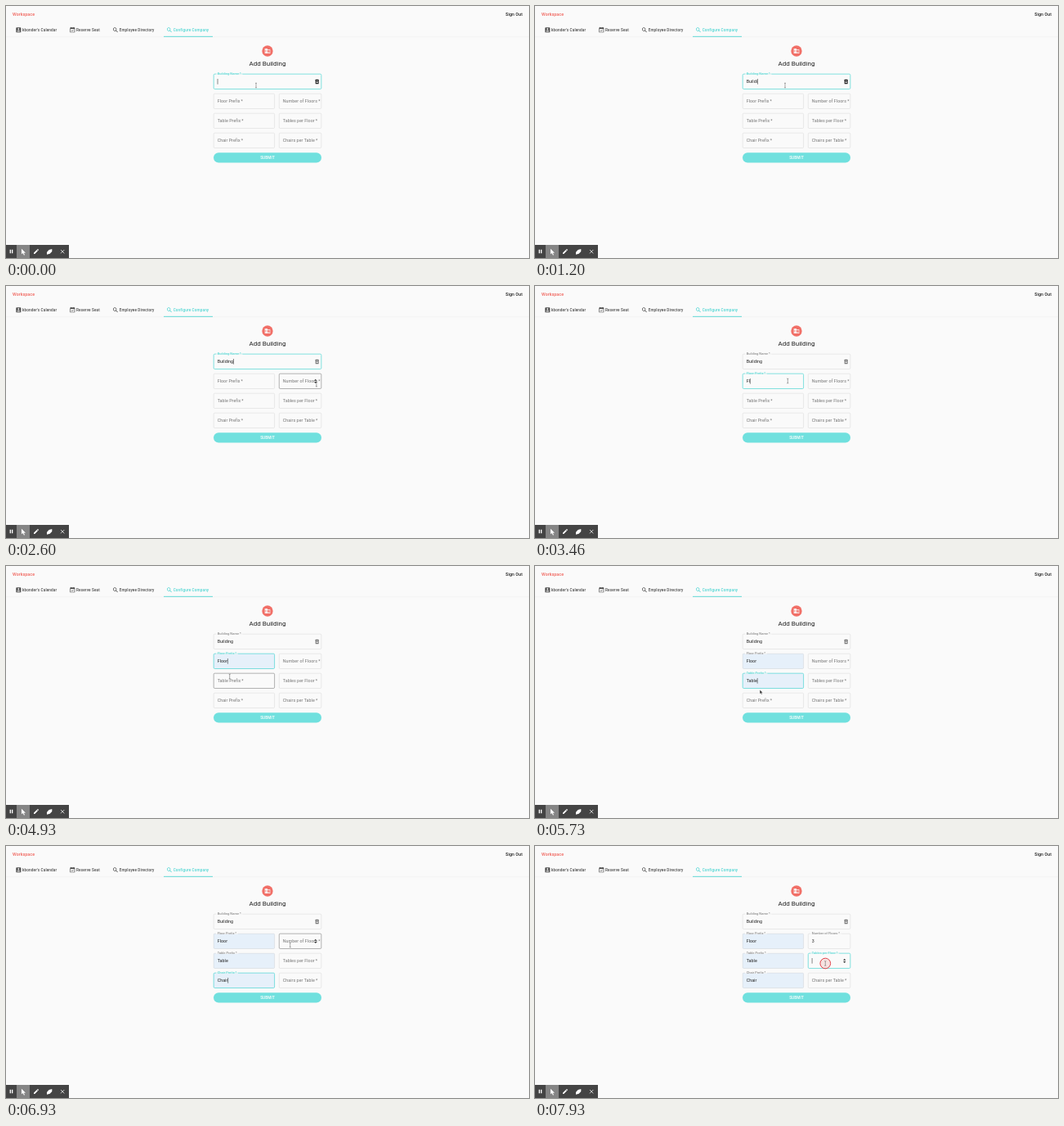
An HTML page for the animation above (8000 ms loop, 640 by 308 pixels).

```html
<!DOCTYPE html>
<html lang="en">
<head>
<meta charset="utf-8">
<title>Add Building</title>
<style>
html, body { margin: 0; height: 100%; overflow: hidden; background: #fafafa; }
svg { display: block; width: 100vw; height: 100vh; font: 16px Roboto, sans-serif; letter-spacing: .15px; fill: #212121; }
.tab { font-weight: 500; font-size: 14px; letter-spacing: .4px; fill: #4a4a4a; }
.on { fill: #4fd6d3; }
.label { fill: #757575; }
.small { font-size: 12px; letter-spacing: .11px; }
.focus { fill: #45d3d0; }
.box { fill: none; stroke: #c2c2c2; }
.box.hover { stroke: #212121; }
.box.focus { stroke: #45d3d0; stroke-width: 2; fill: none; }
</style>
</head>
<body>
<svg id="stage" viewBox="0 0 1920 924">
  <text x="24" y="37" font-weight="500" fill="#f0625a">Workspace</text>
  <text x="1896" y="37" font-weight="500" text-anchor="end">Sign Out</text>
  <path d="M0 113.5H1920" stroke="#e2e2e2"/>
  <path d="M579 112H759" stroke="#45d3d0" stroke-width="2.5"/>
  <g id="tabs"></g>

  <circle cx="960" cy="165" r="20" fill="#f16f67"/>
  <path transform="translate(948 153)" fill="#fafafa" d="M12 7V3H2v18h20V7H12zM6 19H4v-2h2v2zm0-4H4v-2h2v2zm0-4H4V9h2v2zm0-4H4V5h2v2zm4 12H8v-2h2v2zm0-4H8v-2h2v2zm0-4H8V9h2v2zm0-4H8V5h2v2zm10 12h-8v-2h2v-2h-2v-2h2v-2h-2V9h8v10zm-2-8h-2v2h2v-2zm0 4h-2v2h2v-2z"/>
  <text x="960" y="218" text-anchor="middle" style="font-size:24px;letter-spacing:0">Add Building</text>

  <g id="form"></g>
  <g id="card">
    <rect x="1136" y="269" width="12" height="17" rx="2"/>
    <circle cx="1142" cy="275" r="2" fill="#fafafa"/>
    <path d="M1138.5 282a3.5 3.5 0 0 1 7 0z" fill="#fafafa"/>
  </g>
  <path id="spin" d="M-5-2L0-8 5-2zM-5 2L0 8 5 2z" fill="#333"/>
  <path id="caret" d="M0-10V10" stroke="#111" stroke-width="1.5"/>

  <rect x="762" y="538" width="396" height="36.5" rx="18.25" fill="#70e0de"/>
  <text class="tab" x="960" y="561" text-anchor="middle" style="fill:#fff">SUBMIT</text>

  <rect y="876" width="231" height="48" fill="#444"/>
  <rect x="39" y="876" width="48" height="48" fill="#858585"/>
  <g fill="#fff">
    <path d="M14 893h4v14h-4zM21 893h4v14h-4z"/>
    <path d="M57 890v20l5-4 4 8 3-2-4-7h7z"/>
    <path transform="translate(99 888)" d="M3 17.25V21h3.75L17.81 9.94l-3.75-3.75L3 17.25zM20.71 7.04c.39-.39.39-1.02 0-1.41l-2.34-2.34c-.39-.39-1.02-.39-1.41 0l-1.83 1.83 3.75 3.75 1.83-1.83z"/>
    <path d="M150 911v-9l8-8 11-3v9l-8 8z"/>
    <path d="M201 894l13 13M214 894l-13 13" stroke="#fff" stroke-width="2.2"/>
  </g>

  <circle id="ring" fill="#e53935" fill-opacity=".12" stroke="#e0434b" stroke-width="3"/>
  <path id="beam" d="M-3-9Q0-9 0-6V6Q0 9-3 9M3-9Q0-9 0-6M0 6Q0 9 3 9" fill="none" stroke="#555" stroke-width="1.5"/>
  <path id="arrow" d="M0 0V14L3.3 11 5.8 16.5 8.3 15.3 6 10H10.5z" stroke="#fff"/>
</svg>
<script>
const $ = id => document.getElementById(id);

function add(parent, tag, attrs, text = '') {
  const el = document.createElementNS('http://www.w3.org/2000/svg', tag);
  for (const k in attrs) el.setAttribute(k, attrs[k]);
  el.textContent = text;
  return parent.appendChild(el);
}
const show = (el, on) => el.setAttribute('visibility', on ? 'visible' : 'hidden');
const move = (el, x, y) => el.setAttribute('transform', `translate(${x} ${y})`);

// Tabs
const search = 'M15.5 14h-.79l-.28-.27C15.41 12.59 16 11.11 16 9.5 16 5.91 13.09 3 9.5 3S3 5.91 3 9.5 5.91 16 9.5 16c1.61 0 3.09-.59 4.23-1.57l.27.28v.79l5 4.99L20.49 19l-4.99-5zm-6 0C7.01 14 5 11.99 5 9.5S7.01 5 9.5 5 14 7.01 14 9.5 11.99 14 9.5 14z';
const person = 'M3 5v14c0 1.1.89 2 2 2h14c1.1 0 2-.9 2-2V5c0-1.1-.9-2-2-2H5c-1.11 0-2 .9-2 2zm12 4c0 1.66-1.34 3-3 3s-3-1.34-3-3 1.34-3 3-3 3 1.34 3 3zm-9 8c0-2 4-3.1 6-3.1s6 1.1 6 3.1v1H6v-1z';
const dated = 'M16.53 11.06L15.47 10l-4.88 4.88-2.12-2.12-1.06 1.06L10.59 17l5.94-5.94zM19 3h-1V1h-2v2H8V1H6v2H5c-1.11 0-1.99.9-1.99 2L3 19c0 1.1.89 2 2 2h14c1.1 0 2-.9 2-2V5c0-1.1-.9-2-2-2zm0 16H5V8h14v11z';
[[34, person, "kbonder's Calendar"], [232, dated, 'Reserve Seat'],
 [390, search, 'Employee Directory'], [588, search, 'Configure Company']].forEach(([x, icon, name], i) => {
  const cls = i == 3 ? 'tab on' : 'tab';
  add($('tabs'), 'path', { d: icon, class: cls, transform: `translate(${x} 76)` });
  add($('tabs'), 'text', { x: x + 26, y: 93, class: cls }, name);
});

// Form fields: the first spans the row, the others sit in two columns
const fields = ['Building Name', 'Floor Prefix', 'Number of Floors', 'Table Prefix',
  'Tables per Floor', 'Chair Prefix', 'Chairs per Table'].map((name, i) => {
  const right = i > 0 && i % 2 == 0;
  const x = right ? 1002.3 : 762, y = 249 + 72 * Math.ceil(i / 2);
  const w = i == 0 ? 396 : right ? 155.7 : 224.3;
  const g = $('form');
  const shape = { x, y, width: w, height: 56, rx: 4 };
  const f = { x, y, w, right };
  f.fill = add(g, 'rect', { ...shape, fill: '#e6f0fa' });
  f.box = add(g, 'rect', { ...shape, x: x + .5, y: y + .5, width: w - 1, height: 55 });
  f.notch = add(g, 'rect', { x: x + 9, y: y - 1, height: 3, fill: '#fafafa' });
  f.label = add(g, 'text', { x: x + 14, class: 'label small' }, name + '\u2009*');
  f.notch.setAttribute('width', f.label.getComputedTextLength() + 10);
  f.value = add(g, 'text', { x: x + 14, y: y + 34 });
  return f;
});

// [time, field, text, autofilled]
const steps = [
  [-440, 0, ''], [400, 0, 'B'], [660, 0, 'Bu'], [800, 0, 'Bui'], [860, 0, 'Buil'],
  [1000, 0, 'Build'], [1130, 0, 'Buildi'], [1260, 0, 'Buildin'], [1400, 0, 'Building'],
  [2800, 1, ''], [3130, 1, 'F'], [3460, 1, 'Fl'], [3600, 1, 'Flo'], [3730, 1, 'Floo'], [4600, 1, 'Floor', true],
  [5200, 3, ''], [5400, 3, 'T'], [5660, 3, 'Table', true],
  [6060, 5, ''], [6200, 5, 'C'], [6330, 5, 'Ch'], [6660, 5, 'Chair', true],
  [7130, 2, ''], [7460, 2, '3'], [7930, 4, '']
];
const clicks = steps.filter(s => s[0] > 0 && !s[2]).map(s => s[0]);

// Pointer path: [time, x, y] in stage pixels
const path = [
  [0, 306, 97], [1780, 306, 97], [1800, 345, 99], [1860, 381, 102], [2000, 406, 127],
  [2330, 476, 126], [2800, 309.3, 116], [4430, 309.3, 116], [4600, 284, 129.5], [4930, 273.7, 135],
  [5200, 274, 140], [5460, 274, 141], [5660, 275, 151.3], [5900, 275.5, 152], [6060, 277, 163],
  [6400, 277, 164], [6600, 282, 175], [6700, 284, 176], [6930, 347.7, 121], [7130, 349, 118],
  [7460, 349, 118], [7860, 355.3, 143.5], [8000, 355.3, 143.5]
];

function pointer(t) {
  const i = path.findIndex(p => p[0] > t);
  const [t0, x0, y0] = path[i - 1], [t1, x1, y1] = path[i];
  const k = (t - t0) / (t1 - t0);
  return [3 * (x0 + (x1 - x0) * k), 3 * (y0 + (y1 - y0) * k)];
}

function draw(t) {
  const done = steps.filter(s => s[0] <= t);
  const [last, active] = done[done.length - 1];
  const [px, py] = pointer(t);
  let hovered = null;

  fields.forEach((f, i) => {
    const [, , text = '', auto] = done.filter(s => s[1] == i).pop() || [];
    const focus = i == active;
    const hover = px > f.x && px < f.x + f.w && py > f.y && py < f.y + 56;
    const raised = focus || text != '';
    if (hover) hovered = f;
    f.value.textContent = text;
    f.box.setAttribute('class', 'box' + (focus ? ' focus' : hover ? ' hover' : ''));
    f.label.setAttribute('class', 'label' + (raised ? ' small' : '') + (focus ? ' focus' : ''));
    f.label.setAttribute('y', f.y + (raised ? 4 : 34));
    show(f.notch, raised);
    show(f.fill, auto);
  });

  const f = fields[active], text = f.value.textContent;
  move($('caret'), f.x + 15 + (text ? f.value.getComputedTextLength() : 0), f.y + 28);
  show($('caret'), Math.floor((t - last) / 500) % 2 == 0);

  $('card').setAttribute('opacity', hovered == fields[0] ? 1 : .6);
  const number = hovered && hovered.right ? hovered : f.right ? f : null;
  show($('spin'), number);
  if (number) move($('spin'), number.x + 134, number.y + 28);

  const age = t - clicks.filter(c => c <= t).pop();
  show($('ring'), age < 130);
  $('ring').setAttribute('r', age < 70 ? 19 : 34);
  $('ring').setAttribute('opacity', age < 70 ? 1 : .4);
  for (const id of ['ring', 'beam', 'arrow']) move($(id), px, py);
  show($('beam'), hovered);
  show($('arrow'), !hovered);
}

const start = performance.now();
function tick(now) {
  draw(Math.max(0, now - start) % 8000);
  requestAnimationFrame(tick);
}
draw(0);
requestAnimationFrame(tick);
</script>
</body>
</html>
```
